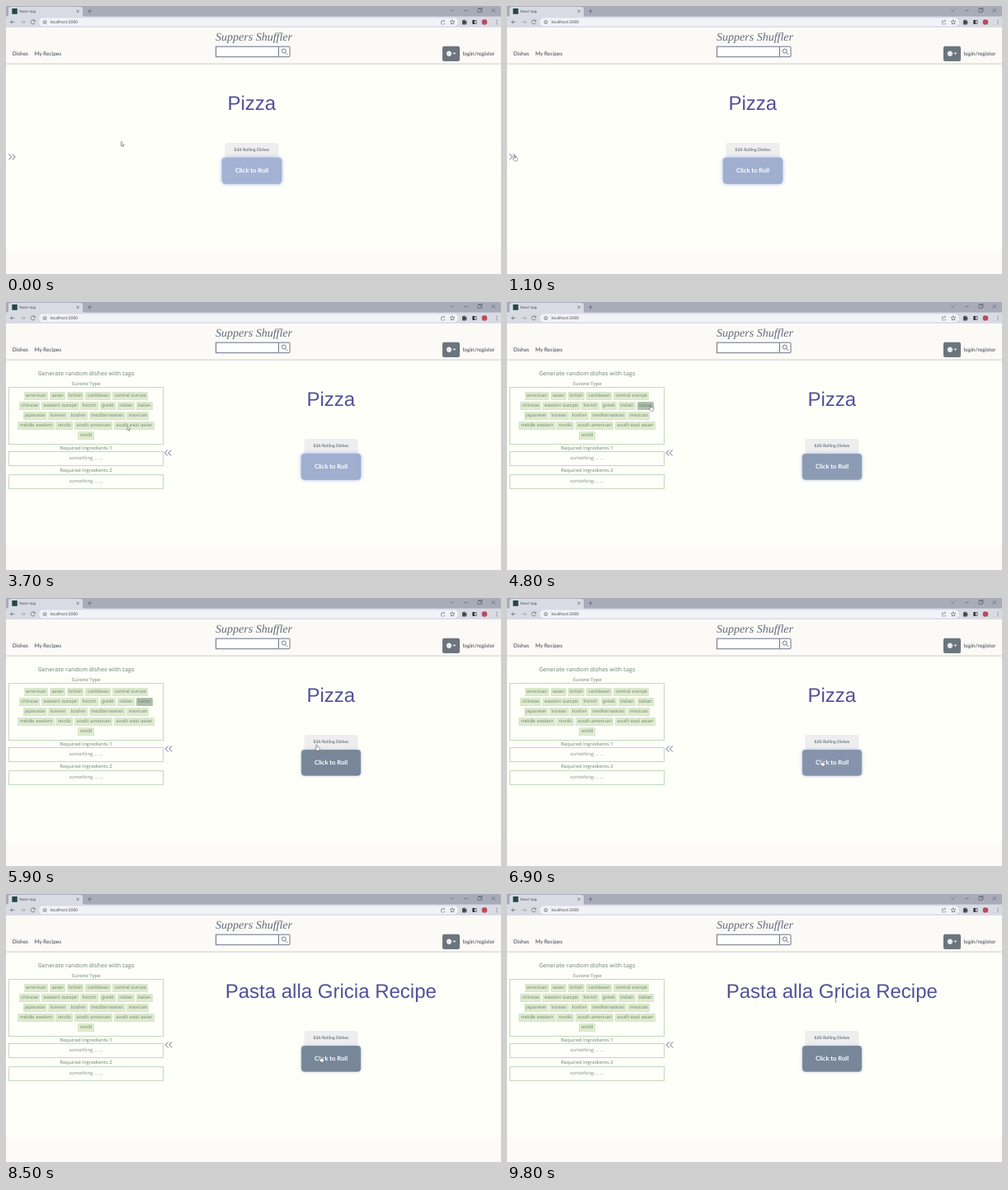
These frames come from a looping animation (600x325 px, 9900 ms). An HTML page:

```html
<!DOCTYPE html>
<html lang="en">
<head>
<meta charset="utf-8">
<title>React App</title>
<style>
  html, body { margin: 0; width: 100%; height: 100%; overflow: hidden; background: #fffffa; }
  #stage { position: relative; width: 600px; height: 325px; overflow: hidden; text-rendering: geometricPrecision; }
  svg { position: absolute; left: 0; top: 0; display: block; }
  .ui { font: 5px "Open Sans", sans-serif; fill: #3c4043; }
  .nav { font: 600 6.5px Lato, sans-serif; fill: #555b62; }
  .brand { font: italic 14px "Liberation Serif", serif; fill: #626b7c; }
  .line { fill: none; stroke: #5c6069; stroke-width: .7; }
  .dish { font: 24px "Liberation Sans", Arial, sans-serif; fill: #53509a; }
  .edit { font: bold 5.2px Lato, sans-serif; fill: #727b84; }
  .roll { font: bold 7.6px Lato, sans-serif; fill: #fff; }
  .mid { text-anchor: middle; }
  .chev { fill: none; stroke: #67688f; stroke-width: 1; }
  #panel { position: absolute; left: 0; top: 0; color: #8a9c91; font: 600 5.8px "Open Sans", sans-serif; text-align: center; }
  #panel > * { position: absolute; left: 3px; width: 188px; box-sizing: border-box; }
  #panel h1, #panel h2 { margin: 0; font: inherit; line-height: 10px; }
  #panel h1 { font-size: 7.05px; }
  .box { border: 1px solid #c0dab8; font-weight: 400; color: #7f8a86; }
  .field { height: 18px; line-height: 15.5px; }
  .row { display: flex; justify-content: center; gap: 1.8px; height: 10.2px; margin-bottom: 1.75px; }
  .row span { padding: 0 2.3px; background: #e0ebd0; border-radius: 1.5px; box-shadow: inset 0 0 0 .5px #cfe2be;
    font: 6.05px/10.2px "Liberation Sans", Arial, sans-serif; color: #789078; white-space: nowrap; }
  .row span.on { background: #b0bfae; box-shadow: none; color: #74897c; }
</style>
</head>
<body>
<div id="stage">
  <svg width="600" height="325" viewBox="0 0 600 325">
    <defs>
      <filter id="soft" x="-20%" y="-40%" width="140%" height="180%"><feGaussianBlur stdDeviation="2.2"/></filter>
      <linearGradient id="shade" x2="0" y2="1">
        <stop stop-color="#d3d2cf"/><stop offset="1" stop-color="#fffffa"/>
      </linearGradient>
    </defs>
    <rect width="600" height="325" fill="#fffffa"/>
    <rect y="295" width="600" height="30" fill="#fcfbf7"/>

    <!-- browser window -->
    <rect width="600" height="14" fill="#a8acb9"/>
    <path d="M1 13Q3 13 3 11V4Q3 1 6 1H90Q93 1 93 4V11Q93 13 95 13Z" fill="#d9dbe3"/>
    <rect y="12.7" width="600" height="13.3" fill="#d9dbe3"/>
    <rect x="40" y="14.5" width="508" height="10" rx="5" fill="#f2f3f7"/>
    <rect x="7.3" y="3" width="6.4" height="6.8" fill="#24483f"/>
    <text class="ui" x="16.3" y="8.2" style="font-size:4.3px">React App</text>
    <g class="line">
      <path d="M85.5 4.7l3.2 3.2m0-3.2l-3.2 3.2M98.8 6.3h5m-2.5-2.5v5"/>
      <path d="M538.3 4.5l1.9 1.9 1.9-1.9M555.3 5.7h4.4M572 3.5h4v4h-4zM573 3.5v-1h4v4h-1M588.8 3.4l4.2 4.2m0-4.2l-4.2 4.2"/>
      <path d="M10.5 19.5h-5m2.2-2.2l-2.2 2.2 2.2 2.2"/>
      <path d="M18 19.5h5m-2.2-2.2l2.2 2.2-2.2 2.2" stroke="#9a9ea7"/>
      <path d="M34.7 18.2a2.5 2.5 0 1 0 .1 2.2M35 16.7v1.8h-1.8"/>
      <circle cx="47" cy="19.5" r="2"/><path d="M47 19v1.6"/>
      <path d="M530.5 18h-3v4h4v-1.5M528.8 20q.4-2.4 3-2.4m-1.2-1.2l1.2 1.2-1.2 1.2" stroke="#8b8f98"/>
      <path d="M541 16.7l.8 1.8 2 .2-1.5 1.4.4 2-1.7-1-1.7 1 .4-2-1.5-1.4 2-.2z"/>
      <path d="M595 17v.9m0 1.2v.9m0 1.2v.9" stroke-width="1"/>
    </g>
    <path d="M553 17.5h1.3a1 1 0 0 1 2 0h1.5v1.6a1 1 0 0 1 0 2V22.5H553z" fill="#484c55"/>
    <rect x="565.3" y="17" width="5" height="5" rx=".7" fill="#34383f"/><path d="M568 17.8h1.6v3.4H568z" fill="#e8e9ee"/>
    <circle cx="580" cy="19.5" r="3.3" fill="#b74b5c"/>
    <text class="ui" x="53.5" y="21.4">localhost:3000</text>

    <!-- site header -->
    <rect y="26" width="600" height="44" fill="#fcfaf6"/>
    <rect y="69.5" width="600" height="2.5" fill="url(#shade)"/>
    <text class="brand mid" x="300.5" y="41.7">Suppers Shuffler</text>
    <text class="nav" x="7.7" y="60">Dishes</text>
    <text class="nav" x="34.2" y="60">My Recipes</text>
    <text class="nav" x="553.8" y="60">login/register</text>
    <g fill="#fff" stroke="#6a7386">
      <rect x="254.5" y="49.2" width="76" height="12.5"/>
      <rect x="330.5" y="49.2" width="13.5" height="12.5" rx="1"/>
      <circle cx="336.8" cy="54.5" r="2.5"/><path d="M338.7 56.4l2.6 2.6"/>
    </g>
    <rect x="529" y="48.7" width="21" height="18.3" rx="2" fill="#6c757d"/>
    <g fill="none" stroke="#fff" stroke-width=".6">
      <circle cx="537" cy="57.7" r="2.8" fill="#cbd0d4"/>
      <path d="M534.2 57.7h5.6M537 54.9v5.6"/><ellipse cx="537" cy="57.7" rx="1.3" ry="2.8"/>
    </g>
    <path d="M541.5 56.7h4l-2 2z" fill="#fff"/>

    <!-- roller -->
    <g id="main">
      <text id="dish" class="dish mid" x="297.8" y="126.3">Pizza</text>
      <rect x="265.3" y="166" width="65.3" height="17" rx="3" fill="#eeeeef"/>
      <text class="edit mid" x="298" y="175.5">Edit Rolling Dishes</text>
      <rect id="glow" x="261.5" y="183.5" width="73" height="32.5" rx="4.5" filter="url(#soft)"/>
      <rect id="button" x="262" y="184" width="72" height="31.5" rx="4" stroke-width=".6"/>
      <text id="label" class="roll mid" x="298" y="202.4">Click to Roll</text>
    </g>
    <path id="chev" class="chev"/>
  </svg>

  <div id="panel">
    <h1 style="top:82px">Generate random dishes with tags</h1>
    <h2 style="top:94.3px">Cuisine Type</h2>
    <div id="tags" class="box" style="top:103px;height:70px;padding-top:5.3px"></div>
    <h2 style="top:172px">Required Ingredients 1</h2>
    <div class="box field" style="top:181px">something ... ...</div>
    <h2 style="top:199.3px">Required Ingredients 2</h2>
    <div class="box field" style="top:209px">something ... ...</div>
  </div>

  <svg width="600" height="325" viewBox="0 0 600 325">
    <g id="cursor" stroke="#555" stroke-width=".6" fill="#fff">
      <path id="arrow" d="M0 0V6l1.4-1.2 1 2.2.9-.4-1-2.2H4.2Z"/>
      <path id="hand" d="M0 .3Q.6-.4 1.2.3V2.8Q2 2.3 2.5 3 3.3 2.6 3.7 3.4 4.6 3.2 4.7 4V5.8L4 7.7H.8L-1.4 4.7Q-1.3 3.7 0 4.5Z"/>
      <path id="beam" d="M-1-4.5H1M0-4.5V4.5M-1 4.5H1" fill="none"/>
    </g>
  </svg>
</div>

<script>
const LOOP = 9900, STEP = 100, PULSE = 1300;
const OPEN = 1500, HOVER = 4300, BLUR = 6500, ROLL = 7100, DONE = 8400;
const $ = id => document.getElementById(id);

const cuisines = [
  "american,asian,british,caribbean,central europe",
  "chinese,eastern europe,french,greek,indian,italian",
  "japanese,korean,kosher,mediterranean,mexican",
  "middle eastern,nordic,south american,south east asian",
  "world"
];
$("tags").innerHTML = cuisines.map(row =>
  `<div class="row">${row.split(",").map(c => `<span id="${c.replace(/ /g, "-")}">${c}</span>`).join("")}</div>`
).join("");

// time, x, y of the pointer tip
const path = [
  [0, 139.5, 164.5], [200, 139.5, 164.5], [1000, 8.5, 181], [1500, 8.5, 181],
  [2100, 95, 170], [2600, 162.8, 158], [3100, 162.8, 158], [3700, 147, 150],
  [4400, 173.5, 125.3], [5200, 173.5, 125.3], [5800, 376, 178], [5900, 376, 178],
  [6300, 381, 197], [9000, 381, 197], [9600, 398.5, 127], [9900, 398.5, 127]
];

function pointerAt(t) {
  const i = path.findIndex(p => p[0] > t);
  const [t0, x0, y0] = path[i - 1], [t1, x1, y1] = path[i];
  const k = (t - t0) / (t1 - t0), e = k * k * (3 - 2 * k);
  return [x0 + (x1 - x0) * e, y0 + (y1 - y0) * e];
}

function pointerKind(x, y, t) {
  if (y < 132 && x > 260) return "beam";
  const onChevron = x < 13 && t <= OPEN;
  const onTag = t >= HOVER && x < 181 && y < 131;
  const onButton = x > 358 && y > 166;
  return onChevron || onTag || onButton ? "hand" : "arrow";
}

const mix = (a, b, k) => `rgb(${a.map((v, i) => Math.round(v + (b[i] - v) * k))})`;

function draw(t) {
  const open = t >= OPEN, rolling = t >= ROLL && t < DONE;
  const dark = (.5 - .5 * Math.cos(2 * Math.PI * (t / PULSE + .02))) ** 1.4;

  $("panel").style.display = open ? "" : "none";
  $("main").setAttribute("transform", `translate(${open ? 96 : 0})`);
  $("italian").className = t >= HOVER && t < BLUR ? "on" : "";
  $("dish").textContent = t < ROLL ? "Pizza" : rolling ? "Lemon Icebox Cake Ice Cream" : "Pasta alla Gricia Recipe";
  $("label").textContent = rolling ? "Rolling" : "Click to Roll";

  $("button").setAttribute("fill", mix([164, 178, 212], [117, 132, 150], dark));
  $("button").setAttribute("stroke", mix([160, 176, 214], [152, 165, 182], dark));
  $("glow").setAttribute("fill", mix([150, 174, 232], [175, 186, 203], dark));
  $("glow").setAttribute("opacity", .8 - .4 * dark);

  const w = open ? -3.4 : 3.4, x = open ? 196.8 + dark : 6.7 - dark;
  $("chev").setAttribute("d", [-w, .3 * w].map(o => `M${x + o} 179.4l${w} 3.5l${-w} 3.5`).join(""));

  const [px, py] = pointerAt(t), kind = pointerKind(px, py, t);
  $("cursor").setAttribute("transform", `translate(${px} ${py}) scale(.9)`);
  for (const k of ["arrow", "hand", "beam"]) $(k).style.display = k === kind ? "" : "none";
}

const start = performance.now();
function tick() {
  const t = (performance.now() - start) % LOOP;
  draw(Math.floor(t / STEP) * STEP);
  requestAnimationFrame(tick);
}
tick();
</script>
</body>
</html>
```
